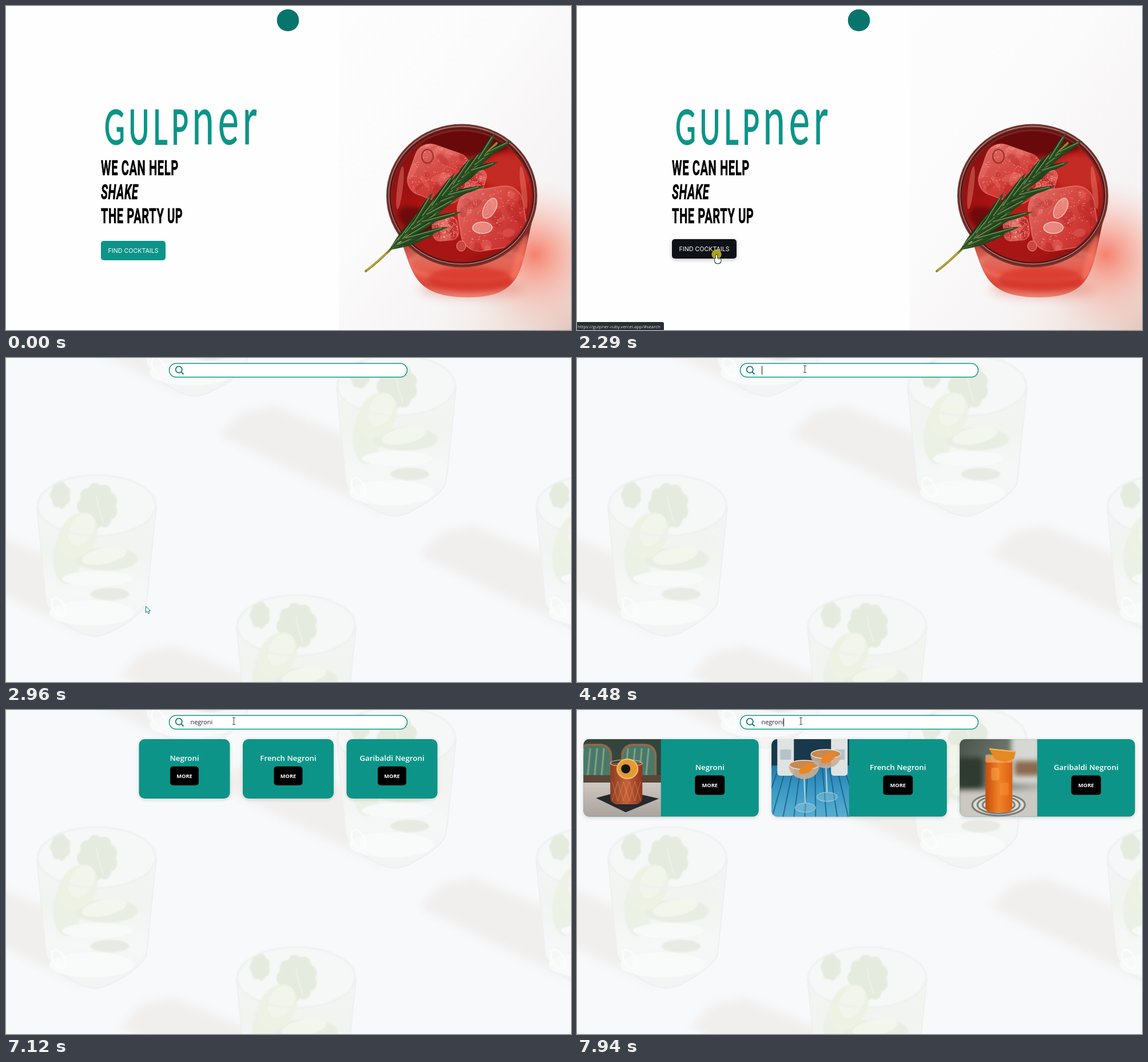
Write an HTML page with a canvas that moves like this. It is 988 px wide and 567 px high and loops after 8 s.

```html
<!DOCTYPE html>
<html lang="en">
<head>
<meta charset="utf-8">
<title>Gulpner</title>
<style>
html, body { margin: 0; width: 100%; height: 100%; overflow: hidden; background: #fefefe; }
canvas { display: block; }
</style>
</head>
<body>
<canvas id="stage" width="988" height="567"></canvas>
<script>
const W = 988, H = 567, LOOP = 8000;
const TEAL = '#0d9488', DEEP = '#0f766e';
const SANS = '"Open Sans", "Noto Sans", sans-serif';
const view = document.getElementById('stage').getContext('2d');

const clamp = v => Math.max(0, Math.min(1, v));
const span = (t, a, b) => clamp((t - a) / (b - a));
const smooth = p => p * p * (3 - 2 * p);
const mix = (a, b, p) => a + (b - a) * p;
function cubic(p, a, b, c, d) {
  const q = 1 - p;
  return q * q * q * a + 3 * q * q * p * b + 3 * q * p * p * c + p * p * p * d;
}
function randomizer(seed) {
  return () => (seed = (seed * 16807) % 2147483647) / 2147483647;
}

function layer(w, h, paint) {
  const cv = document.createElement('canvas');
  cv.width = w;
  cv.height = h;
  paint(cv.getContext('2d'));
  return cv;
}
// runs a drawing step with its own position, turn and blur
function place(c, x, y, turn, blur, draw) {
  c.save();
  c.translate(x, y);
  c.rotate(turn);
  if (blur) c.filter = `blur(${blur}px)`;
  draw();
  c.restore();
}
function trace(c, pts) {
  c.beginPath();
  for (let i = 0; i < pts.length; i += 2) c.lineTo(pts[i], pts[i + 1]);
}
function poly(c, fill, ...pts) {
  trace(c, pts);
  c.closePath();
  c.fillStyle = fill;
  c.fill();
}
function line(c, color, width, ...pts) {
  trace(c, pts);
  c.strokeStyle = color;
  c.lineWidth = width;
  c.stroke();
}
function oval(c, x, y, rx, ry, fill, edge, width = 1, turn = 0) {
  c.beginPath();
  c.ellipse(x, y, rx, ry, turn, 0, 7);
  if (fill) { c.fillStyle = fill; c.fill(); }
  if (edge) { c.strokeStyle = edge; c.lineWidth = width; c.stroke(); }
}
function box(c, x, y, w, h, r, fill) {
  c.beginPath();
  c.roundRect(x, y, w, h, r);
  c.fillStyle = fill;
  c.fill();
}
function label(c, str, x, y, font, color, align = 'left') {
  c.font = font;
  c.fillStyle = color;
  c.textAlign = align;
  c.fillText(str, x, y);
}
function stops(g, colors) {
  colors.forEach((k, i) => g.addColorStop(i / (colors.length - 1), k));
  return g;
}
const ramp = (c, x0, y0, x1, y1, ...colors) => stops(c.createLinearGradient(x0, y0, x1, y1), colors);
const glow = (c, x, y, r, ...colors) => stops(c.createRadialGradient(x, y, 0, x, y, r), colors);

function iceCube(c, x, y, size, turn, seed) {
  const rnd = randomizer(seed), r = size / 2;
  place(c, x, y, turn, 0, () => {
    box(c, -r, -r * .92, size, size * .92, r * .55, ramp(c, -r, -r, r, r, '#e0706a', '#d5443e', '#bf2424'));
    c.strokeStyle = 'rgba(245,150,138,.45)';
    c.lineWidth = 2;
    c.stroke();
    c.clip();
    for (let i = 0; i < 26; i++) {
      const tone = rnd() < .5 ? 'rgba(160,16,20,.22)' : 'rgba(250,150,138,.22)';
      oval(c, (rnd() - .5) * size, (rnd() - .5) * size, 4 + rnd() * 15, 3 + rnd() * 7, tone, null, 1, rnd() * 3);
    }
    c.fillStyle = 'rgba(255,222,214,.6)';
    for (let i = 0; i < 150; i++) c.fillRect((rnd() - .5) * size, (rnd() - .6) * size * .8, 1 + rnd(), 1);
  });
}

function leaf(c, x, y, angle, len, w) {
  place(c, x, y, angle, 0, () => {
    c.beginPath();
    c.moveTo(0, 0);
    c.quadraticCurveTo(len * .5, -w * 2, len, 0);
    c.quadraticCurveTo(len * .5, w * 2, 0, 0);
    c.fillStyle = ramp(c, 0, -w, 0, w, '#16300f', '#2d5524', '#1d3a18');
    c.fill();
    line(c, 'rgba(158,184,132,.7)', 1.3, len * .12, -w * .3, len * .85, -w * .2);
  });
}
function sprig(c) {
  const rnd = randomizer(5);
  const stem = p => [cubic(p, 629, 672, 730, 858), cubic(p, 464, 432, 366, 240)];
  c.lineCap = 'round';
  line(c, '#8c8a2a', 4, ...Array.from({ length: 21 }, (_, i) => stem(i / 20)).flat());
  line(c, '#c2a83e', 2, ...stem(.02), ...stem(.25));
  c.lineCap = 'butt';
  for (let i = 0; i < 30; i++) {
    const p = .27 + .68 * i / 29, right = i % 3 > 0;
    const lean = right ? .08 + rnd() * .52 : -.06 - rnd() * .16;
    leaf(c, ...stem(p), lean - .83, mix(112, 52, p) * (.8 + rnd() * .35), 4.6);
  }
}

function paintDrink(c) {
  c.fillStyle = ramp(c, 582, 0, 988, 300, '#fdfdfd', '#fcfbfb', '#f5f3f3');
  c.fillRect(582, 0, 406, H);
  c.fillStyle = glow(c, 990, 570, 250, 'rgba(222,178,164,.7)', 'rgba(236,205,195,.4)', 'rgba(250,240,238,0)');
  c.fillRect(582, 200, 406, 367);
  c.fillStyle = glow(c, 925, 435, 130, 'rgba(246,110,88,.85)', 'rgba(248,160,142,.45)', 'rgba(250,200,190,0)');
  c.fillRect(582, 200, 406, 367);
  place(c, 815, 495, 0, 9, () => oval(c, 0, 0, 92, 15, 'rgba(225,130,118,.5)'));

  c.save();
  c.beginPath();
  c.moveTo(674, 372);
  c.bezierCurveTo(715, 450, 695, 509, 808, 510);
  c.bezierCurveTo(915, 509, 898, 450, 928, 345);
  c.closePath();
  c.fillStyle = ramp(c, 0, 400, 0, 510, '#8e2422', '#c04a40', '#e06a5c', '#e65a4a', '#d8473a', '#ee8474');
  c.fill();
  c.clip();
  place(c, 810, 452, 0, 3, () => {
    oval(c, 0, 0, 104, 28, null, 'rgba(250,150,134,.5)', 4);
    oval(c, 2, 26, 74, 22, 'rgba(214,44,32,.55)');
    oval(c, 88, -12, 7, 42, 'rgba(250,120,98,.7)', null, 1, .3);
  });
  c.restore();

  oval(c, 797, 332, 131, 124.5, '#742522', '#6a3a34', 2);
  oval(c, 797, 331, 127.5, 120.5, null, '#b98a80', 1.3);
  oval(c, 797, 333, 122, 114, ramp(c, 700, 230, 860, 450, '#83100f', '#a31212', '#c32019', '#8f0d0e'));
  c.save();
  c.clip();
  place(c, 797, 333, 0, 4, () => {
    oval(c, 10, -95, 80, 24, '#68090c');
    oval(c, -75, 45, 40, 22, '#6f090c', null, 1, .5);
    oval(c, 78, -42, 42, 32, '#c42b24');
    oval(c, -30, 90, 60, 22, '#a81515');
  });
  iceCube(c, 815, 303, 46, .3, 8);
  iceCube(c, 757, 294, 100, .34, 17);
  iceCube(c, 768, 390, 44, -.1, 23);
  iceCube(c, 850, 372, 116, -.15, 91);
  oval(c, 737, 263, 10, 12, null, '#98302c', 2);
  oval(c, 846, 354, 10, 19, 'rgba(246,170,158,.55)', '#f4bcb0', 1.5, .5);
  oval(c, 833, 388, 17, 10, 'rgba(248,180,168,.6)', '#f6cabf', 1.5);
  oval(c, 796, 420, 8, 9, '#c9473f', '#ee968c');
  for (const side of [-1, 1]) oval(c, 797 + side * 108, 318, 5, 38, 'rgba(240,140,126,.4)', null, 1, -side * .12);
  c.restore();
  oval(c, 797, 332, 125.5, 117.5, null, '#551312', 2);
  sprig(c);
}

// display type in a narrow face: one shared squeeze; returns the end of the run
function narrow(c, str, x, y, font, color, ratio, weight) {
  c.save();
  c.translate(x, y);
  c.scale(ratio, 1);
  c.lineWidth = weight;
  c.strokeStyle = color;
  label(c, str, 0, 0, font, color);
  c.strokeText(str, 0, 0);
  const w = c.measureText(str).width * ratio;
  c.restore();
  return x + w;
}

function paintHome(c) {
  c.fillStyle = '#fefefe';
  c.fillRect(0, 0, W, H);
  paintDrink(c);
  oval(c, 493, 25, 19.3, 19.3, '#08756d');

  c.letterSpacing = '12px';
  const x = narrow(c, 'GULP', 172, 242, '84px Lato, sans-serif', TEAL, .58, 2);
  narrow(c, 'ner', x, 242, '118px Lato, sans-serif', TEAL, .58, .5);
  c.letterSpacing = '1px';
  ['WE CAN HELP', 'SHAKE', 'THE PARTY UP'].forEach((str, i) =>
    narrow(c, str, 166, 296 + 42 * i, (i === 1 ? 'italic ' : '') + '700 36px Roboto, sans-serif', '#000', .56, .6));
  c.letterSpacing = '0px';
}

// a leaf with a toothed rim
function mint(c, x, y, rx, ry, teeth) {
  c.beginPath();
  for (let a = 0; a < 6.28; a += .05) {
    const r = .88 + .12 * Math.abs(Math.sin(a * teeth / 2));
    c.lineTo(x + Math.cos(a) * rx * r, y + Math.sin(a) * ry * r);
  }
  c.fillStyle = '#e5ebdf';
  c.fill();
}

function paleGlass(c, x, y) {
  place(c, x, y, 0, 7, () => poly(c, '#f1efed', -150, 345, -112, 305, -55, 294, 70, 345, 140, 486));
  place(c, x, y, 0, 0, () => {
    c.beginPath();
    c.moveTo(54, 260);
    c.lineTo(70, 425);
    c.bezierCurveTo(72, 452, 130, 487, 156, 487);
    c.bezierCurveTo(180, 487, 244, 448, 246, 425);
    c.lineTo(263, 260);
    c.fillStyle = ramp(c, 0, 260, 0, 487, '#f3f5f3', '#f2f4f1', '#f6f7f7', '#f2f3f2');
    c.fill();
    c.strokeStyle = '#eeefef';
    c.lineWidth = 2;
    c.stroke();
    oval(c, 158.5, 258, 104, 53, '#f6f8f7');
  });
  place(c, x, y, 0, 1, () => {
    oval(c, 106, 350, 24, 46, '#ecf1e6');
    oval(c, 175, 352, 56, 20, '#e9eee4');
    oval(c, 172, 346, 40, 14, '#f3f6ec', null, 1, -.2);
    oval(c, 182, 413, 34, 11, '#e8ebe4');
    oval(c, 150, 446, 74, 22, '#f9fafa');
    oval(c, 160, 386, 62, 13, '#f8fafa');
    mint(c, 95, 240, 18, 24, 7);
    mint(c, 160, 259, 36, 41, 9);
    line(c, '#f3f6ee', 1.5, 158, 240, 162, 262, 170, 288);
    oval(c, 126, 310, 32, 42, '#edf2e5', null, 1, .5);
    oval(c, 132, 300, 20, 30, '#f2f5ec', null, 1, .5);
    oval(c, 158.5, 258, 103, 53, null, '#edefef', 2.5);
    oval(c, 92, 436, 10, 18, null, '#fcfdfd', 3, -.5);
  });
}

function paintBackdrop(c) {
  c.fillStyle = '#f7f9fb';
  c.fillRect(0, 0, W, H);
  for (let k = -2; k <= 1; k++)
    for (const i of [0, 1]) paleGlass(c, 349 * (k + i) + 175 * -k + (i ? 0 : 0) + (k === 0 && i === 0 ? 0 : 0), 212 * (k + i) - 0);
}

const P = 136;
const photos = [
  c => {
    box(c, 0, 0, P, P, 0, '#33453c');
    for (const x of [-12, 66]) {
      box(c, x, 8, 62, 90, 20, '#8b6a4c');
      box(c, x + 4, 12, 54, 90, 17, '#48796a');
      for (let i = 1; i < 5; i++) line(c, '#86a184', 3, x + i * 12, 16, x + i * 12 - 5, 70);
    }
    box(c, 0, 63, P, 16, 0, '#5a4638');
    box(c, 0, 76, P, 60, 0, ramp(c, 0, 76, 0, P, '#d0c7c0', '#aaa39e'));
    poly(c, '#25282d', 22, 103, 70, 90, 132, 104, 74, 128);
    box(c, 47, 42, 56, 72, [2, 2, 12, 12], ramp(c, 47, 0, 103, 0, '#8a3c20', '#c5613a', '#8c351e'));
    for (let i = 0; i < 5; i++)
      for (const d of [0, 10]) line(c, 'rgba(238,164,120,.5)', 1, 50 + i * 10 + d, 74, 60 + i * 10 - d, 108);
    oval(c, 75, 42, 28, 6, null, '#d9bfae', 1.2);
    oval(c, 77, 52, 18, 17, '#e39a35', '#f2c46c', 2);
    oval(c, 74, 52, 8, 8, '#171416');
  },
  c => {
    box(c, 0, 0, P, P, 0, ramp(c, 0, 30, 0, P, '#1e6d99', '#3797c4', '#57aed2'));
    for (let i = -4; i < 12; i++) line(c, '#1b587c', 1.5, 40 + i * 12, 40, 20 + i * 19, P);
    box(c, 0, 0, P, 46, 0, '#18384c');
    for (const x of [10, 104]) {
      box(c, x, -8, 29, 72, 5, '#dfe3e2');
      box(c, x + 5, 18, 19, 18, 2, '#b5c3c9');
    }
    for (const [x, y] of [[57, 45], [95, 26]]) {
      line(c, '#c6dde5', 2, x, y + 20, x + 2, y + 67);
      c.beginPath();
      c.ellipse(x, y, 27, 25, 0, 0, Math.PI);
      c.fillStyle = 'rgba(203,175,150,.9)';
      c.fill();
      oval(c, x, y, 26, 8, '#c88a51', '#efe8df', 1.3);
      oval(c, x + 4, y + 7, 14, 7, '#ed8423', null, 1, -.5);
      oval(c, x + 2, y + 75, 18, 8, 'rgba(190,220,230,.25)', '#acd3df');
    }
  },
  c => {
    box(c, 0, 0, P, P, 0, ramp(c, 0, 0, P, 90, '#49534a', '#6d776d', '#b9bab2'));
    place(c, 0, 0, 0, 4, () => {
      box(c, 90, -5, 52, 82, 0, '#d5d8d3');
      box(c, -5, 32, 46, 54, 8, '#303a31');
      box(c, 96, 38, 46, 26, 4, '#8b6a50');
      box(c, -5, 90, 150, 60, 0, '#ccc8c2');
    });
    for (let i = 0; i < 4; i++) oval(c, 68, 115, 46 - i * 9, 19 - i * 4, '#deddd8', '#797b77', 3);
    box(c, 45, 29, 47, 99, [3, 3, 9, 9], ramp(c, 45, 0, 92, 0, '#c64d0c', '#f0832a', '#db6011'));
    box(c, 55, 50, 14, 22, 4, 'rgba(255,172,80,.45)');
    box(c, 70, 76, 16, 22, 4, 'rgba(255,160,66,.35)');
    box(c, 45, 27, 47, 14, 3, 'rgba(245,199,144,.55)');
    poly(c, '#e38a22', 51, 16, 98, 21, 95, 34, 80, 40, 62, 36);
    line(c, '#f9bd59', 2, 52, 17, 97, 22);
  }
].map(paint => layer(P, P, paint));

const home = layer(W, H, paintHome);
const backdrop = layer(W, H, c => {
  c.fillStyle = '#f7f9fb';
  c.fillRect(0, 0, W, H);
  // two slanted directions span the repeating pattern
  for (let a = -1; a <= 1; a++)
    for (let b = -1; b <= 1; b++) paleGlass(c, 349 * a + 524 * b, 210 * (a - b));
});

function arrow(c, x, y) {
  place(c, x + .5, y + .5, 0, 0, () => {
    poly(c, '#fff', 0, 0, 0, 11, 2.5, 9, 4.5, 13, 6.5, 12, 4.7, 8.2, 8, 8);
    c.strokeStyle = DEEP;
    c.lineWidth = 1;
    c.stroke();
  });
}
function hand(c, x, y) {
  place(c, x, y, 0, 0, () => {
    const shape = (grow, color) => {
      box(c, -1.2 - grow, .5 - grow, 2.4 + grow * 2, 10 + grow * 2, 1.5, color);
      box(c, -3 - grow, 6.5 - grow, 10.5 + grow * 2, 9 + grow * 2, [2, 3, 5, 5], color);
    };
    shape(.9, '#16343a');
    shape(0, '#fff');
    for (const fx of [3, 5.2]) line(c, '#16343a', .7, fx, 6, fx, 9);
  });
}
function beam(c, x, y) {
  line(c, '#444', 1, x + .5, y - 5, x + .5, y + 6);
  for (const end of [-5.5, 6.5]) line(c, '#444', 1, x - 2, y + end, x + 3, y + end);
}
const spot = (c, x, y) => oval(c, x, y, 8.6, 8.6, 'rgba(190,181,25,.9)');

function status(c, alpha) {
  if (alpha <= 0) return;
  c.globalAlpha = alpha;
  box(c, -2, 553, 154, 16, [0, 3, 0, 0], '#292e35');
  label(c, 'https://gulpner-ruby.vercel.app/#search', 1, 563.5, '7.8px ' + SANS, '#d9dde0');
  c.globalAlpha = 1;
}
function shadowed(c, alpha, draw) {
  c.save();
  c.shadowColor = `rgba(0,0,0,${alpha})`;
  c.shadowBlur = 6;
  c.shadowOffsetY = 2;
  draw();
  c.restore();
}

function homeScene(c, t) {
  c.drawImage(home, 0, 0);
  const p = smooth(span(t, 1200, 1490)), y = 411 - 3 * p;
  const shade = [mix(13, 14, p), mix(148, 17, p), mix(136, 22, p)].map(Math.round);
  shadowed(c, .25 * p, () => box(c, 166, y, 113, 34, 5, `rgb(${shade})`));
  label(c, 'FIND COCKTAILS', 222.5, y + 20.7, '10.7px Inter, sans-serif', '#fff', 'center');
  status(c, span(t, 1260, 1450));

  if (t < 390) return;
  const a = smooth(span(t, 320, 530)), b = smooth(span(t, 700, 1230));
  const x = mix(mix(785, 588, a), 244, b);
  const py = mix(mix(529, 424, a), 441, b) - 6 * span(t, 1740, 1830);
  if (t >= 2290) spot(c, 244, 434.5);
  (x > 166 && x < 279 ? hand : arrow)(c, x, py);
}

function cards(c, t) {
  if (t < 7060) return;
  const names = ['Negroni', 'French Negroni', 'Garibaldi Negroni'];
  const loaded = names.map((_, i) => t >= 7190 + 100 * i);
  const widths = loaded.map(on => on ? 306.5 : 159);
  const gap = 22.5, tall = loaded[0] ? 135.5 : 104, mid = 51 + tall / 2;
  let x = 493.5 - (widths.reduce((a, b) => a + b) + gap * 2) / 2;
  names.forEach((name, i) => {
    const w = widths[i], pic = loaded[i] ? 135.5 : 0, cx = x + (w + pic) / 2;
    shadowed(c, .14, () => box(c, x, 51, w, tall, 10, TEAL));
    if (pic) {
      c.save();
      c.beginPath();
      c.roundRect(x, 51, pic, tall, [10, 0, 0, 10]);
      c.clip();
      c.drawImage(photos[i], x, 51);
      c.restore();
    }
    const bw = pic ? 52 : 50;
    label(c, name, cx, mid - 14, '600 13.3px ' + SANS, '#fff', 'center');
    box(c, cx - bw / 2, mid - 4.2, bw, pic ? 34 : 33, 5, '#000');
    label(c, 'MORE', cx, mid + 16.3, '700 9.3px ' + SANS, '#fff', 'center');
    x += w + gap;
  });
}

function searchScene(c, t) {
  c.drawImage(backdrop, 0, 0);
  box(c, 285.5, 9.5, 416, 24, 12, '#fff');
  c.strokeStyle = TEAL;
  c.lineWidth = 1.5;
  c.stroke();
  oval(c, 302.3, 20.3, 5.6, 5.6, null, DEEP, 1.7);
  line(c, DEEP, 1.9, 306.3, 24.3, 310.5, 28.5);

  const typed = 'negroni'.slice(0, t < 5600 ? 0 : 1 + Math.floor((t - 5600) / 143));
  label(c, typed, 322.5, 25, '10.8px ' + SANS, '#1f2430');
  const end = Math.floor(323 + c.measureText(typed).width - (typed ? .5 : 0)) + .5;
  // blinks every 530 ms, steady while keys are pressed
  const since = t - (t < 5600 ? 4410 : Math.min(t, 6460));
  if (t >= 4410 && Math.floor(since / 530) % 2 === 0) line(c, '#111', 1, end, 14, end, 29);

  cards(c, t);
  status(c, 1 - span(t, 2710, 2960));

  // the pointer swings past the field, then settles in it
  const p = smooth(span(t, 3190, 4010));
  const x = cubic(p, 244, 330, 478, 398) - 7 * span(t, 7900, 7940);
  const y = cubic(p, 434, 330, 40, 19);
  if (t >= 4410 && t < 4480) spot(c, 396.5, 18);
  if (t < 2500) hand(c, 244, 435);
  else if (y < 34) beam(c, Math.round(x), Math.round(y));
  else arrow(c, x, y);
}

const start = performance.now();
function tick() {
  const t = (performance.now() - start) % LOOP;
  (t < 2440 ? homeScene : searchScene)(view, t);
  requestAnimationFrame(tick);
}
tick();
</script>
</body>
</html>
```
